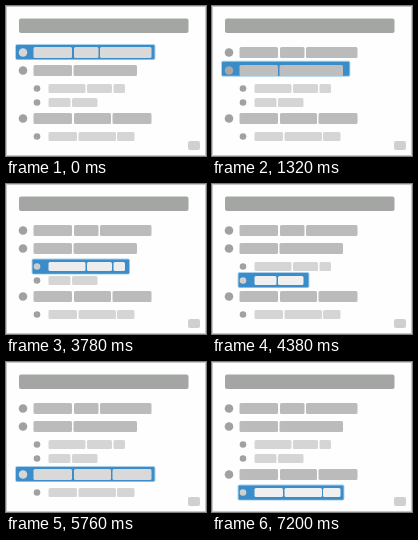
An HTML page that plays this animation: 200x150 px, repeating every 7260 ms.

```html
<!DOCTYPE html>
<html lang="en">
<head>
<meta charset="utf-8">
<title>Outline highlight</title>
<style>
html, body { margin: 0; width: 100%; height: 100%; overflow: hidden; background: #fdfefd; }
svg { display: block; width: 100vw; height: 100vh; }
</style>
</head>
<body>
<svg id="stage" viewBox="0 0 200 150"></svg>
<script>
const LOOP = 7260, TICK = 60;
const stage = document.getElementById('stage');

function add(tag, attrs) {
  const el = document.createElementNS('http://www.w3.org/2000/svg', tag);
  for (const k in attrs) el.setAttribute(k, attrs[k]);
  return stage.appendChild(el);
}
const rect = (x, y, width, height, rx, fill) => add('rect', { x, y, width, height, rx, fill });

const levels = [
  { dotX: 17, r: 4.3, h: 11, bar: 187, barOn: 217, dot: 161, dotOn: 214, boxX: 10 },
  { dotX: 31, r: 3.3, h: 9, bar: 213, barOn: 240, dot: 161, dotOn: 208, boxX: 26.5 }
];

// Bars are pairs of left and right edges
const rows = [
  { level: 0, y: 41, bars: [[27.5, 66], [68, 92.5], [94, 145.5]], box: [39, 148.5] },
  { level: 0, y: 59, bars: [[27.5, 66], [67.5, 131]], box: [57, 136.5] },
  { level: 1, y: 78, bars: [[42.5, 79.5], [81, 106], [107.5, 119]], box: [75, 124] },
  { level: 1, y: 92, bars: [[42.5, 64.5], [66, 91.5]], box: [89, 96.5] },
  { level: 0, y: 107, bars: [[27.5, 66], [68, 105], [106.5, 145.5]], box: [105, 148.5] },
  { level: 1, y: 126, bars: [[42.5, 71], [72.5, 110], [111, 128.5]], box: [123.5, 131.5] }
];

// Start and end of each move to the next row
const moves = [[900, 1500], [2340, 2940], [3720, 4380], [5220, 5760], [6660, 7200]];

add('rect', { x: 0.5, y: 0.5, width: 199, height: 149, fill: '#fdfefd', stroke: '#c6c8c6' });
rect(13, 12.5, 169.5, 14.5, 2, '#a4a6a4');
rect(182, 135, 12, 9, 2, '#cfd1cf');
const glow = rect(0, 0, 0, 16, 2, '#a9cfea');
const box = rect(0, 0, 0, 14.2, 1, '#3a8dc8');

for (const row of rows) {
  const s = row.style = levels[row.level];
  row.dotEl = add('circle', { cx: s.dotX, cy: row.y + s.h / 2, r: s.r });
  row.barEls = row.bars.map(([a, b]) => rect(a, row.y, b - a, s.h, 1.5, '#bbb'));
}

const clamp = v => Math.min(1, Math.max(0, v));
const smooth = v => { v = clamp(v); return v * v * (3 - 2 * v); };
const mix = (a, b, k) => a + (b - a) * k;
const gray = v => `rgb(${v},${v},${v})`;

function place(el, x, y, right, pad) {
  el.setAttribute('x', x - pad);
  el.setAttribute('y', y - pad);
  el.setAttribute('width', right - x + 2 * pad);
}

function draw(ms) {
  const t = Math.floor((ms % LOOP) / TICK) * TICK;
  let at = 0, p = 0;
  moves.forEach(([a, b], i) => {
    if (t >= b) at = i + 1;
    else if (t > a) p = (t - a) / (b - a);
  });
  const from = rows[at], to = rows[Math.min(at + 1, rows.length - 1)];
  const k = smooth(p / 0.84);
  const x = mix(from.style.boxX, to.style.boxX, k);
  const y = mix(from.box[0], to.box[0], k);
  const right = mix(from.box[1], to.box[1], k);
  place(glow, x, y, right, 0.9);
  place(box, x, y, right, 0);

  rows.forEach((row, i) => {
    const s = row.style;
    let on = 0;
    if (i === at) on = 1 - smooth(p / 0.45);
    else if (i === at + 1) on = smooth((p - 0.62) / 0.38);
    row.dotEl.setAttribute('fill', gray(Math.round(mix(s.dot, s.dotOn, on))));
    const fill = gray(Math.round(mix(s.bar, s.barOn, on)));
    row.barEls.forEach(el => el.setAttribute('fill', fill));
  });
}

const start = performance.now();
function frame() {
  draw(performance.now() - start);
  requestAnimationFrame(frame);
}
frame();
</script>
</body>
</html>
```
